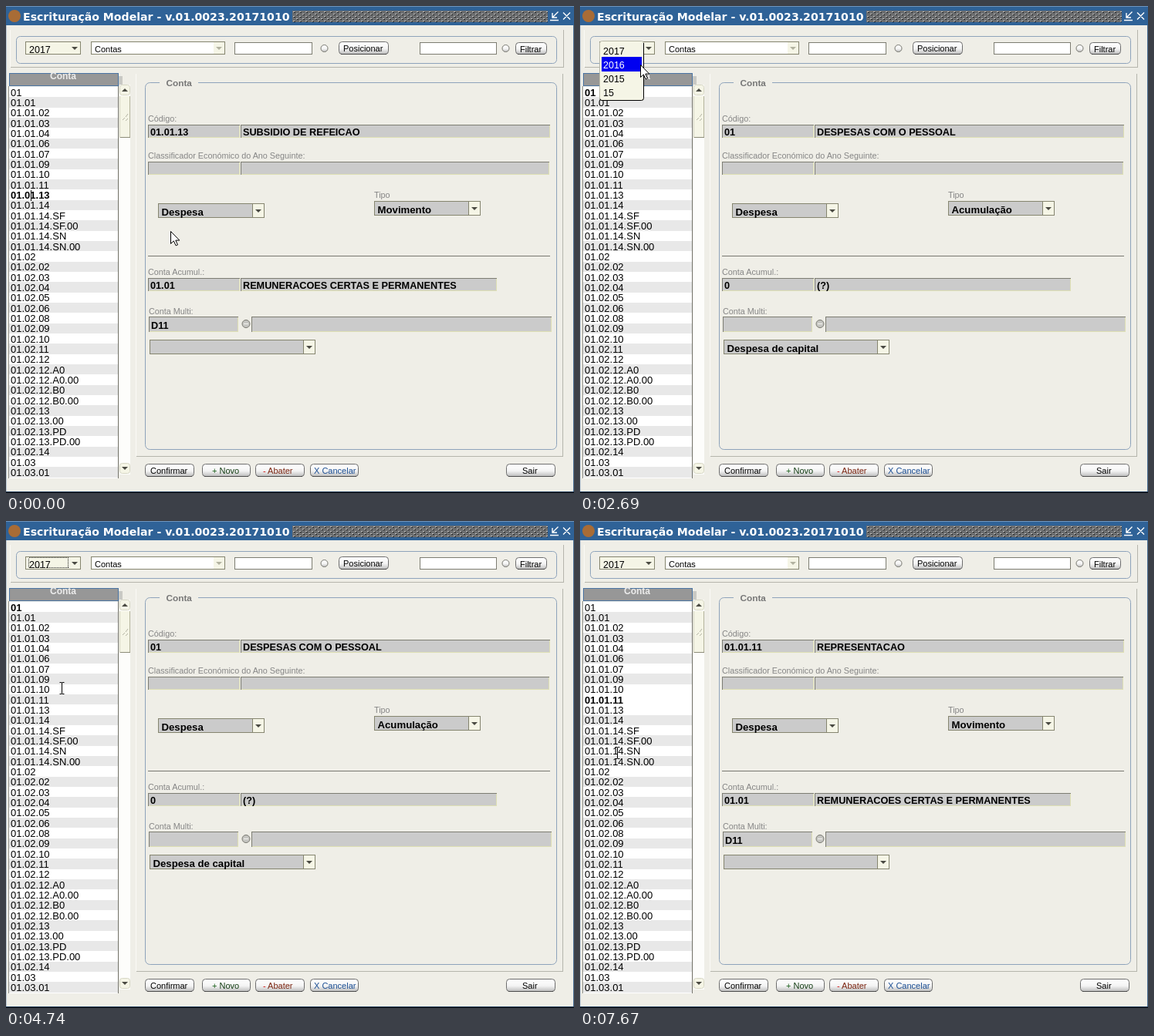
An HTML page for the animation above (8000 ms loop, 736 px wide and 632 px high).

```html
<!DOCTYPE html>
<html lang="pt">
<head>
<meta charset="utf-8">
<title>Escrituração Modelar</title>
<style>
  html, body { margin: 0; width: 100%; height: 100%; overflow: hidden; background: #efeee7; }
  svg { display: block; width: 736px; height: 632px; font-family: "Liberation Sans", Arial, sans-serif; }
  text { white-space: pre; }
  rect, line { shape-rendering: crispEdges; }
  .soft { shape-rendering: auto; }
  .title { font-family: "DejaVu Sans", Verdana, sans-serif; }
</style>
</head>
<body>
<svg id="stage" viewBox="0 0 736 632">
  <defs>
    <pattern id="bumps" x="371" y="6" width="8" height="6" patternUnits="userSpaceOnUse">
      <rect width="8" height="6" fill="#6c6e70"/>
      <path d="M1 1h2v1h-2zM5 4h2v1h-2z" fill="#c4c4c4"/>
      <path d="M2 2h2v1h-2zM6 5h2v1h-2z" fill="#1e1e1e"/>
    </pattern>
    <linearGradient id="glossy" x2="0" y2="1">
      <stop offset="0" stop-color="#fff"/>
      <stop offset=".55" stop-color="#f4f4f4"/>
      <stop offset="1" stop-color="#bcbcbc"/>
    </linearGradient>
    <clipPath id="lowerPart"><rect x="20" y="105" width="70" height="15"/></clipPath>
  </defs>
</svg>
<script>
const LOOP = 8000;
const stage = document.getElementById('stage');
const CREAM = '#f5f5e6', GREY = '#cbcbcb', EDGE = '#7d7d72', FRAME = '#8ea3bb';

function el(tag, attrs, parent = stage) {
  const node = document.createElementNS('http://www.w3.org/2000/svg', tag);
  for (const k in attrs) node.setAttribute(k, attrs[k]);
  return parent.appendChild(node);
}
const box = (x1, y1, x2, y2, fill, parent) =>
  el('rect', { x: x1, y: y1, width: x2 - x1, height: y2 - y1, fill }, parent);
const line = (x1, y1, x2, y2, stroke, parent) =>
  el('path', { d: `M${x1} ${y1}L${x2} ${y2}`, stroke, fill: 'none' }, parent);
const outline = (x1, y1, x2, y2, fill, stroke, rx = 0, parent) =>
  el('rect', { x: x1 + .5, y: y1 + .5, width: x2 - x1 - 1, height: y2 - y1 - 1, fill, stroke, rx,
    class: rx ? 'soft' : '' }, parent);
const show = (node, on) => node.setAttribute('visibility', on ? 'visible' : 'hidden');

// cy is the middle of the capital letters
function label(x, cy, str, size, fill = '#000', attrs = {}, parent) {
  const t = el('text', { x, y: Math.round(cy + size * .36), 'font-size': size, fill, ...attrs }, parent);
  t.textContent = str;
  return t;
}
const bold = { 'font-weight': 700 };
const caption = (x, cy, str) => label(x, cy, str, 10.8, '#858585');
const triangle = (x, y, fill = '#4a4a42', up = 1) =>
  el('path', { d: `M${x - 4} ${y - 2 * up}h8l-4 ${4 * up}z`, fill });

function field(x1, y1, x2, y2, cy) {
  box(x1, y1, x2, y2, GREY);
  box(x1, y2 - 1, x2, y2, '#dedfb4');
  box(x2 - 1, y1, x2, y2, '#dedfb4');
  box(x1, y1, x2, y1 + 1, EDGE);
  box(x1, y1, x1 + 1, y2, EDGE);
  return label(x1 + 3, cy, '', 12.7, '#000', bold);
}
function combo(x1, y1, x2, y2, fill, arrow) {
  outline(x1, y1, x2, y2, fill, '#85856f');
  box(x2 - 15, y1 + 1, x2 - 1, y2 - 1, CREAM);
  triangle(x2 - 8, (y1 + y2) / 2 + .5, arrow);
}
function greyCombo(x1, y1, x2, y2) {
  combo(x1, y1, x2, y2, GREY);
  box(x2 - 16, y1 + 1, x2 - 15, y2 - 1, '#85856f');
  return label(x1 + 4.5, y1 + 11.3, '', 13.2, '#000', bold);
}
function radio(cx, cy, r, fill = 'url(#glossy)') {
  el('circle', { cx, cy, r, fill, stroke: '#77776f' });
}
function button(x1, y1, x2, y2, tx, parts) {
  outline(x1, y1, x2, y2, 'url(#glossy)', '#6e6e6e', 4);
  line(x1 + 3, y2 - .5, x2 - 3, y2 - .5, '#4c4c4c');
  const t = label(tx, (y1 + y2) / 2 + 1, '', 11);
  for (const [str, fill] of parts) el('tspan', { fill }, t).textContent = str;
}

function drawTitleBar() {
  box(0, 0, 736, 25, '#2f6297');
  box(0, 0, 736, 1, '#6f94bb');
  el('circle', { cx: 11, cy: 13, r: 8, fill: '#a86c36' });
  label(22, 13.6, 'Escrituração Modelar - v.01.0023.20171010', 14.1, '#fff', { ...bold, class: 'title' });
  box(371, 6, 702, 21, 'url(#bumps)');
  el('path', { d: 'M715.5 7.5l-7 7M708 9v6h6M705 18.5h11M722 8.5l9 9M731 8.5l-9 9',
    stroke: '#fff', 'stroke-width': 1.4, fill: 'none' });
  box(0, 25, 1, 632, '#b9c6d3');
  box(735, 25, 736, 632, '#44688f');
  box(0, 630, 736, 631, '#23405f');
  box(0, 631, 736, 632, '#0c0c0c');
}

function drawToolbar() {
  line(6, 79.5, 723, 79.5, '#b5b5ac');
  line(722.5, 31, 722.5, 80, '#b5b5ac');
  line(5.5, 31, 5.5, 80, '#fafaf6');
  outline(13, 39, 714, 75, 'none', FRAME, 5);
  combo(25, 46, 97, 63, CREAM);
  label(30, 56.5, '2017', 12.5);
  combo(110, 46, 284, 63, '#fff', '#b2b2a0');
  label(115, 56, 'Contas', 11);
  outline(296, 47, 397, 63, '#fff', EDGE);
  radio(412.5, 55, 4.5);
  button(431, 46, 496, 63, 437, [['Posicionar', '#000']]);
  outline(536, 47, 636, 63, '#fff', EDGE);
  radio(647.5, 55, 4.5);
  button(660, 47, 701, 63, 666, [['Filtrar', '#000']]);
}

const tails = ['', '.01', ...'02 03 04 06 07 09 10 11 13 14 14.SF 14.SF.00 14.SN 14.SN.00'.split(' ').map(s => '.01.' + s),
  '.02', ...'02 03 04 05 06 08 09 10 11 12 12.A0 12.A0.00 12.B0 12.B0.00 13 13.00 13.PD 13.PD.00 14'.split(' ').map(s => '.02.' + s),
  '.03', '.03.01'];
const rowY = i => 112 + i * 40 / 3;

function drawList() {
  box(146, 91, 151, 104, '#c9c9c4');
  outline(4, 87, 146, 104, '#979797', '#4a74a3');
  label(57, 91, 'Conta', 12, '#ececec', bold);
  box(4, 105, 145, 613, '#fff');
  const rows = tails.map((tail, i) => {
    const top = Math.round(rowY(i) - 7), bottom = Math.round(rowY(i + 1) - 7);
    const back = box(4, top, 145, Math.min(bottom, 613), i % 2 ? '#e8e8e8' : '#fff');
    return { back, text: label(6, rowY(i), '01' + tail, 13) };
  });
  box(3, 104, 4, 613, '#8f8f88');
  box(145, 104, 146, 613, '#77776f');
  box(147, 102, 161, 608, '#fdfdfb');
  outline(147, 102, 161, 116, CREAM, '#d6d6c4', 3);
  triangle(154, 109, '#4a4a42', -1);
  box(148, 117, 160, 171, CREAM);
  line(160.5, 117, 160.5, 171, '#b4b49c');
  line(148, 170.5, 161, 170.5, '#8c8c78');
  line(147.5, 117, 147.5, 171, '#d6d6c4');
  line(151, 148, 154, 145, '#b4b4a4');
  line(155, 144, 158, 140, '#b4b4a4');
  line(155, 149, 158, 146, '#b4b4a4');
  outline(147, 593, 161, 607, CREAM, '#d6d6c4', 3);
  triangle(154, 600);
  return rows;
}

function drawForm() {
  line(169, 584.5, 722, 584.5, '#b5b5ac');
  line(721.5, 88, 721.5, 585, '#b5b5ac');
  line(168.5, 88, 168.5, 584, '#fafaf6');
  outline(180, 99, 714, 576, 'none', FRAME, 6);
  box(199, 97, 249, 102, '#efeee7');
  label(207.5, 100, 'Conta', 11.8, '#777', bold);
  caption(184, 146.5, 'Código:');
  caption(184, 194.5, 'Classificador Económico do Ano Seguinte:');
  caption(477, 245.5, 'Tipo');
  caption(184, 345.5, 'Conta Acumul.:');
  caption(185, 396.5, 'Conta Multi:');
  line(184, 324.5, 705, 324.5, '#77776f');
  field(184, 202, 303, 219, 210);
  field(304, 202, 704, 219, 210);
  greyCombo(197, 256, 335, 275).textContent = 'Despesa';
  radio(311, 412.5, 5, '#c6c6c2');
  line(308, 412.5, 314, 412.5, '#f4f4f0');
  field(318, 403, 707, 423, 413);
  button(180, 594, 244, 611, 187, [['Confirmar', '#000']]);
  button(254, 594, 317, 611, 267, [['+', '#145a14'], [' Novo', '#123c12']]);
  button(323, 594, 387, 611, 333, [['-', '#d01010'], [' Abater', '#7a2410']]);
  button(394, 594, 457, 611, 399, [['X Cancelar', '#1c4f94']]);
  button(648, 594, 712, 611, 669, [['Sair', '#000']]);
  return [
    field(184, 154, 303, 171, 163), field(304, 154, 705, 171, 163),
    greyCombo(477, 253, 615, 272),
    field(184, 353, 303, 370, 362), field(304, 353, 636, 370, 362),
    field(185, 403, 301, 423, 414), greyCombo(186, 433, 401, 452)
  ];
}

drawTitleBar();
drawToolbar();
const rows = drawList();
const slots = drawForm();

const focus = outline(29, 47, 81, 61, 'none', '#222');
focus.setAttribute('stroke-dasharray', '1 1');
const mark = box(6, 105, 20, 119, '#0000f0');
rows[0].text.parentNode.insertBefore(mark, rows[0].text);
const caret = box(0, 0, 1, 14, '#000');

const popup = el('g', {});
outline(25, 45, 83, 123, CREAM, '#b9b9a8', 3, popup);
el('path', { d: 'M82.5 48V119.5q0 3-3 3H28q-2 0-2-2', stroke: '#000', fill: 'none' }, popup);
const hover = box(28, 66, 80, 85, '#0000f0', popup);
const years = ['2017', '2016', '2015', '15'].map((y, i) => label(30, 58.5 + 18 * i, y, 12.5, '#000', {}, popup));

const arrow = el('path', { d: 'M.5.5v16l3.8-3.6 2.8 6 2.4-1-2.7-5.8h5z', fill: '#fff', stroke: '#000' });
const beam = el('path', { d: 'M-3 -7.5h2.5l.5 .5 .5-.5H3M0-7V7M-3 7.5h2.5l.5-.5 .5 .5H3', fill: 'none', stroke: '#000' });

const common = ['01.01', 'REMUNERACOES CERTAS E PERMANENTES', 'D11', ''];
const records = [
  { from: 0, row: 10, data: ['01.01.13', 'SUBSIDIO DE REFEICAO', 'Movimento', ...common] },
  { from: 70, row: 0, data: ['01', 'DESPESAS COM O PESSOAL', 'Acumulação', '0', '(?)', '', 'Despesa de capital'] },
  { from: 5880, row: 9, data: ['01.01.11', 'REPRESENTACAO', 'Movimento', ...common] }
];

// pointer trips: start, end, number of steps, way points
const trips = [
  [0, 0, 1, [[213, 292]]],
  [970, 1740, 11, [[205, 215], [172, 165], [135, 112], [104, 72], [91, 52]]],
  [2360, 2840, 7, [[89, 55], [82, 68], [78, 76], [66, 86]]],
  [2990, 3370, 6, [[65, 82], [61, 70], [58, 61]]],
  [4250, 4800, 8, [[66, 70], [112, 120], [130, 165], [95, 205], [42, 232]]],
  [6890, 7420, 8, [[44, 240], [52, 270], [48, 301]]]
];

function pointerAt(t) {
  const [t0, t1, n, pts] = trips.filter(p => t >= p[0]).pop();
  const step = n < 2 ? 0 : Math.min(n - 1, Math.floor((t - t0) / (t1 - t0) * (n - 1) + 1e-6));
  const u = n < 2 ? 0 : step / (n - 1) * (pts.length - 1);
  const i = Math.floor(u), a = pts[i], b = pts[Math.min(i + 1, pts.length - 1)];
  return a.map((v, k) => Math.round(v + (b[k] - v) * (u - i)));
}

function render(t) {
  const rec = records.filter(r => t >= r.from).pop();
  slots.forEach((s, i) => { s.textContent = rec.data[i]; });
  rows.forEach((r, i) => r.text.setAttribute('font-weight', i === rec.row ? 700 : 400));
  rows[9].back.setAttribute('fill', rec.row === 9 ? '#fff' : '#e8e8e8');

  const marked = t >= 70 && t < 1910;
  show(mark, marked);
  rows[0].text.setAttribute('fill', marked ? '#fff' : '#000');
  show(focus, t >= 3850 && t < 5880);

  const typing = t < 70 || (t >= 5960 && t < 6430) || (t >= 6890 && t < 7670);
  show(caret, typing);
  caret.setAttribute('x', t < 70 ? 32 : 38);
  caret.setAttribute('y', t < 70 ? 239 : 225);

  const busy = t >= 5880 && t < 5960;
  const [x, y] = busy ? [36, 226] : pointerAt(t);
  const open = t >= 1910 && t < 3850, full = t >= 1970;
  show(popup, open);
  popup.setAttribute('clip-path', full ? 'none' : 'url(#lowerPart)');
  const pick = x > 82 || y < 67 ? 0 : y < 85 ? 1 : 2;
  hover.setAttribute('y', 48 + 18 * pick);
  years.forEach((n, i) => n.setAttribute('fill', i === pick ? '#fff' : '#000'));

  const overList = x < 146 && y > 105;
  const overField = x > 184 && y > 202 && y < 219;
  const text = !busy && !open && (overList || overField);
  show(beam, text);
  show(arrow, !text);
  (text ? beam : arrow).setAttribute('transform', `translate(${x + (text ? .5 : 0)} ${y})`);
}

const start = performance.now();
function tick() {
  render((performance.now() - start) % LOOP);
  requestAnimationFrame(tick);
}
render(0);
requestAnimationFrame(tick);
</script>
</body>
</html>
```
